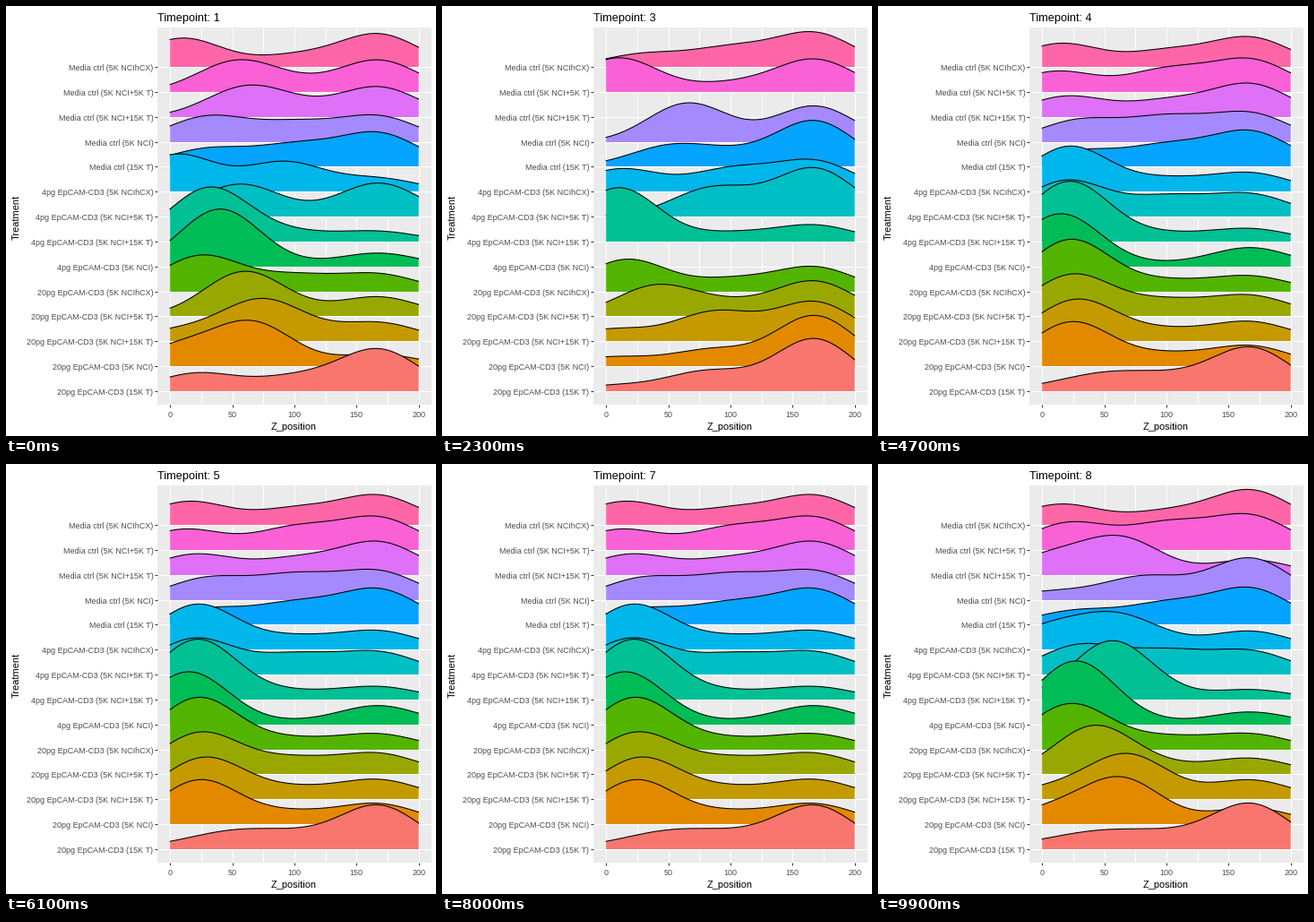
These frames come from a looping animation (480x480 px, 10000 ms). A matplotlib script:

```python
import numpy as np
import matplotlib.pyplot as plt
from matplotlib.animation import FuncAnimation
from matplotlib.patches import Polygon, Rectangle

plt.rcParams["font.family"] = ["Liberation Sans", "DejaVu Sans"]

SIZE, DPI, FRAMES = 480, 100, 100
PT = 72 / DPI                                   # points per pixel
LEFT, RIGHT, TOP, BOTTOM = 169, 474.5, 24, 445  # panel edges
X0, X_UNIT = 183.2, 1.387                       # pixel of z = 0, pixels per unit
Y0, ROW = 430, 27.85                            # lowest baseline, row pitch
ROWS = 14

# Cells sit in three fixed clusters plus one drifting peak, all equally wide.
EDGE, MID, FAR, SPREAD = 5, 100, 168, 32

# Every ridge fades start -> early -> settled -> end, resting in between.
REST_AT = [1, 1.65, 2.65, 4.3, 6.7, 8]
REST_POSE = [0, 1, 1, 2, 2, 3]

fig = plt.figure(figsize=(SIZE / DPI, SIZE / DPI), dpi=DPI, facecolor="white")
ax = fig.add_axes([0, 0, 1, 1])
ax.set_xlim(0, SIZE)
ax.set_ylim(SIZE, 0)
ax.axis("off")

z = np.linspace(0, 200, 279)
xs = X0 + z * X_UNIT


def bump(center, height):
    return height * np.exp(-0.5 * ((z - center) / SPREAD) ** 2)


def hue(i, lum=65, chroma=100):
    """Evenly spaced hue of the polar LUV wheel as sRGB."""
    angle = np.radians(15 + 360 * i / ROWS)
    u = chroma * np.cos(angle) / (13 * lum) + 0.1978
    v = chroma * np.sin(angle) / (13 * lum) + 0.4683
    y = ((lum + 16) / 116) ** 3
    xyz = y * np.array([9 * u / (4 * v), 1, (12 - 3 * u - 20 * v) / (4 * v)])
    to_rgb = np.array([[3.2406, -1.5372, -0.4986],
                       [-0.9689, 1.8758, 0.0415],
                       [0.0557, -0.2040, 1.0570]])
    rgb = np.clip(to_rgb @ xyz, 0, 1)
    return np.where(rgb > 0.0031308, 1.055 * rgb ** (1 / 2.4) - 0.055, 12.92 * rgb)


def segment(x, y, color, width=1.0, zorder=1):
    ax.plot(x, y, color=color, lw=width * PT, solid_capstyle="butt", zorder=zorder)


def text(x, y, s, size, color="black", **kw):
    return ax.text(x, y, s, fontsize=size * PT, color=color, **kw)


class Ridge:
    """near: (z, height) of the drifting peak; mid, far, edge: cluster heights."""
    count = 0

    def __init__(self, label, near, mid, far, edge=(0, 0, 0, 0), gap=False):
        row = Ridge.count
        Ridge.count += 1
        self.base = round(Y0 - row * ROW)
        self.gap = gap
        self.poses = [bump(*n) + bump(MID, m) + bump(FAR, f) + bump(EDGE, e)
                      for n, m, f, e in zip(near, mid, far, edge)]
        order = 30 - row
        self.fill = ax.add_patch(Polygon([(0, 0)], facecolor=hue(row),
                                         edgecolor="none", zorder=order))
        self.line, = ax.plot([], [], color="black", lw=1.07 * PT, zorder=order + 0.5)
        segment([LEFT, RIGHT], [self.base] * 2, "white")
        segment([LEFT - 3, LEFT], [self.base] * 2, "#333333")
        text(164.3, self.base + 0.6, label, 9.05, "#4D4D4D",
             ha="right", va="center_baseline")

    def draw(self, time):
        pose = np.interp(time, REST_AT, REST_POSE)
        k = min(int(pose), 2)
        h = self.poses[k] + (pose - k) * (self.poses[k + 1] - self.poses[k])
        y = self.base - h
        floor = [(xs[-1], self.base), (xs[0], self.base)]
        self.fill.set_xy(np.vstack([np.column_stack([xs, y]), floor]))
        self.line.set_data(xs, y)
        shown = not (self.gap and 1.98 < time < 2.97)
        self.fill.set_visible(shown)
        self.line.set_visible(shown)


# panel, grid and axes
ax.add_patch(Rectangle((LEFT, TOP), RIGHT - LEFT, BOTTOM - TOP, facecolor="#EBEBEB",
                       edgecolor="none", zorder=0))
for v in range(0, 201, 25):
    x = X0 + v * X_UNIT
    segment([x, x], [TOP, BOTTOM], "white", zorder=0.5)
    if v % 50 == 0:
        segment([x, x], [BOTTOM, BOTTOM + 3], "#333333")
        text(x, 459.3, str(v), 9.05, "#4D4D4D", ha="center", va="baseline")
text(321.5, 473, "Z_position", 11, ha="center", va="baseline")
text(16.5, 235.5, "Treatment", 11, rotation=90, ha="right", va="center")
title = text(169, 17, "", 12.8, va="baseline")

# bottom row first
ridges = [
    Ridge("20pg EpCAM-CD3 (15K T)", [(22, 20), (78, 18), (50, 16), (50, 15)],
          mid=(15, 5, 14, 14), far=(46, 58, 48, 50), edge=(0, 6, 4, 7)),
    Ridge("20pg EpCAM-CD3 (5K NCI)", [(66, 47), (85, 18), (24, 49), (64, 50)],
          mid=(1, 0, 12, 0), far=(13, 56, 22, 18), edge=(20, 10, 0, 15)),
    Ridge("20pg EpCAM-CD3 (5K NCI+15K T)", [(71, 40), (88, 32), (28, 46), (68, 48)],
          mid=(9, 0, 11, 2), far=(20, 43, 21, 21), edge=(11, 13, 0, 11)),
    Ridge("20pg EpCAM-CD3 (5K NCI+5K T)", [(59, 48), (40, 33), (25, 46), (42, 53)],
          mid=(4, 12, 16, 7), far=(21, 38, 22, 17)),
    Ridge("20pg EpCAM-CD3 (5K NCIhCX)", [(25, 40), (17, 36), (23, 58), (23, 51)],
          mid=(17, 13, 11, 13), far=(19, 27, 17, 17)),
    Ridge("4pg EpCAM-CD3 (5K NCI)", [(40, 64), (40, 64), (15, 59), (27, 71)],
          mid=(2, 2, 3, 2), far=(15, 15, 21, 14), gap=True),
    Ridge("4pg EpCAM-CD3 (5K NCI+15K T)", [(32, 60), (10, 60), (22, 67), (56, 65)],
          mid=(9, 9, 8, 2), far=(11, 18, 14, 11)),
    Ridge("4pg EpCAM-CD3 (5K NCI+5K T)", [(55, 35), (82, 24), (20, 40), (30, 32)],
          mid=(3, 9, 21, 24), far=(37, 53, 24, 25)),
    Ridge("4pg EpCAM-CD3 (5K NCIhCX)", [(92, 32), (12, 25), (22, 50), (60, 34)],
          mid=(0, 24, 13, 5), far=(14, 33, 20, 20), edge=(41, 0, 0, 23)),
    Ridge("Media ctrl (15K T)", [(30, 19), (50, 21), (28, 17), (28, 15)],
          mid=(22, 12, 22, 22), far=(36, 50, 38, 39)),
    Ridge("Media ctrl (5K NCI)", [(30, 28), (65, 42), (30, 24), (75, 18)],
          mid=(20, 3, 26, 10), far=(28, 40, 31, 46), edge=(0, 0, 0, 9)),
    Ridge("Media ctrl (5K NCI+15K T)", [(60, 31), (60, 31), (20, 23), (64, 40)],
          mid=(9, 9, 17, 0), far=(33, 33, 36, 17), edge=(0, 0, 0, 20), gap=True),
    Ridge("Media ctrl (5K NCI+5K T)", [(53, 33), (10, 38), (12, 23), (22, 30)],
          mid=(8, 9, 24, 28), far=(35, 36, 35, 37)),
    Ridge("Media ctrl (5K NCIhCX)", [(10, 32), (30, 14), (15, 26), (15, 23)],
          mid=(12, 20, 17, 14), far=(36, 37, 32, 38)),
]


def update(i):
    time = 1 + 7 * i / (FRAMES - 1)
    title.set_text(f"Timepoint: {round(time)}")
    for ridge in ridges:
        ridge.draw(time)
    return []


anim = FuncAnimation(fig, update, frames=FRAMES, interval=100, repeat=True,
                     repeat_delay=0)
plt.show()
```
